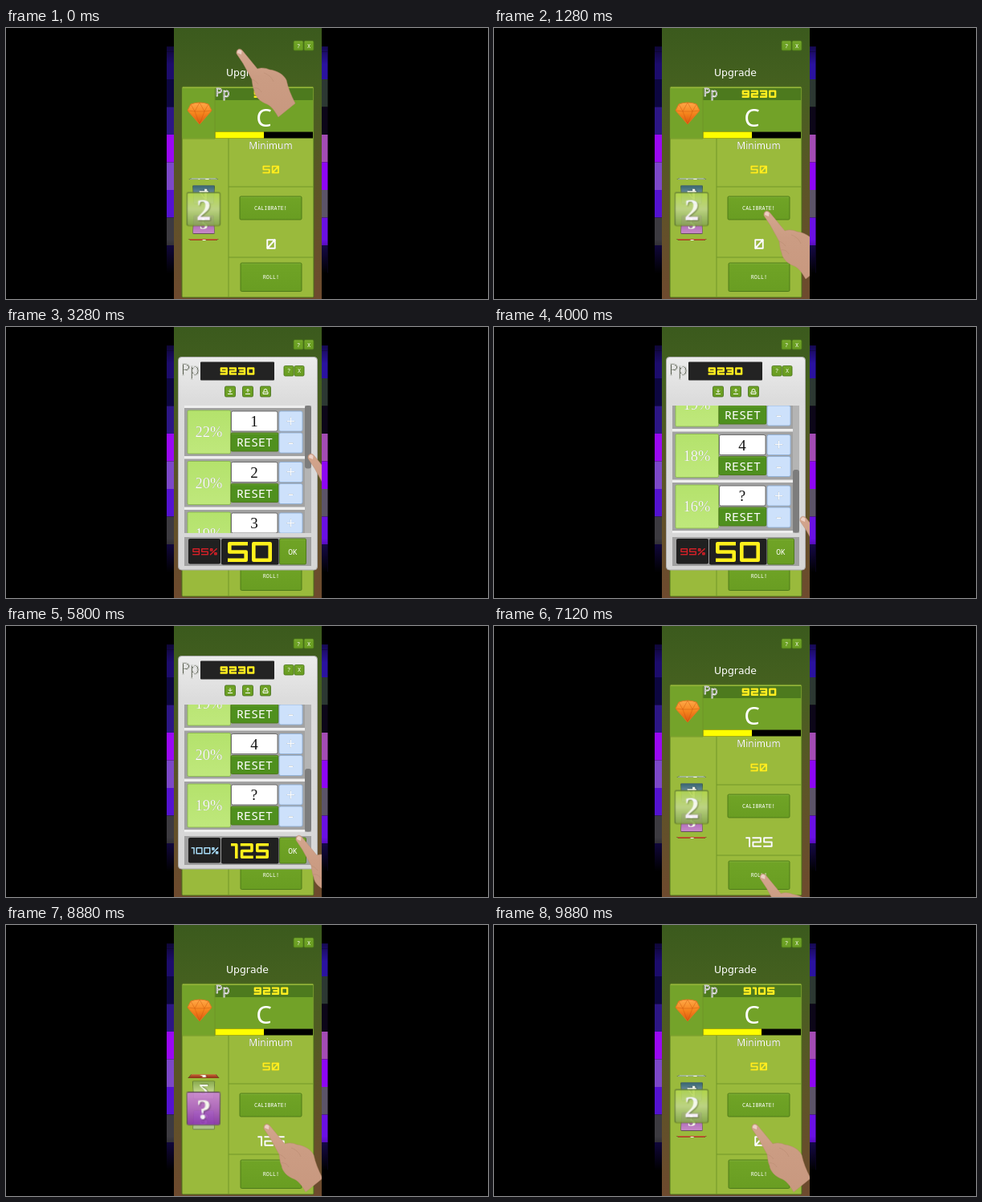
Animation, 600 px wide and 338 px high, one loop 9920 ms. Source, as an HTML page:

```html
<!DOCTYPE html>
<html lang="en">
<head>
<meta charset="utf-8">
<title>Upgrade</title>
<style>
html, body { margin: 0; width: 100%; height: 100%; overflow: hidden; background: #000; }
#stage { position: relative; width: 600px; height: 338px; overflow: hidden; background: #000; }
svg { position: absolute; left: 0; top: 0; }
text { fill: #fff; text-anchor: middle; }
.mono { font-family: "Noto Sans Mono", "DejaVu Sans Mono", monospace; }
.sans { font-family: "Noto Sans", "Open Sans", sans-serif; }
.wide { font-family: "DejaVu Sans", sans-serif; }
.serif { font-family: "Liberation Serif", serif; }
.pp { font-family: "Noto Sans", sans-serif; fill: #3a4030; stroke: #f4f4f4; stroke-width: .9px; }
.sh { filter: drop-shadow(.8px .8px 0 rgba(20, 30, 10, .5)); }
.lcd { fill: none; stroke-linejoin: round; stroke-linecap: square; filter: drop-shadow(.6px .8px 0 rgba(20, 30, 10, .3)); }
#reel { position: absolute; left: 230.3px; top: 210.3px; width: 32.4px; height: 32.4px; perspective: 150px; }
#drum { position: absolute; inset: 0; transform-style: preserve-3d; }
.face {
  position: absolute; inset: 0; box-sizing: border-box; border-radius: 2px;
  border: .7px solid rgba(60, 80, 30, .6); opacity: .9;
  font: bold 28px/31px "Liberation Serif", serif; text-align: center; color: #fff;
  text-shadow: 1px 1px 1px rgba(0, 0, 0, .3);
}
</style>
</head>
<body>
<div id="stage">
  <svg id="base" width="600" height="338"></svg>
  <div id="reel"><div id="drum"></div></div>
  <svg id="over" width="600" height="338"></svg>
</div>
<script>
const LOOP = 9920, TICK = 40;
const $ = id => document.getElementById(id);

// Drawing helpers
const rect = (x, y, w, h, fill, r = 0, more = '') =>
  `<rect x="${x}" y="${y}" width="${w}" height="${h}" rx="${r}" fill="${fill}" ${more}/>`;
const text = (s, x, y, size, cls, more = '') =>
  `<text x="${x}" y="${y}" font-size="${size}" class="${cls}" ${more}>${s}</text>`;
const path = (d, fill, more = '') => `<path d="${d}" fill="${fill}" ${more}/>`;
const grad = (id, ...stops) =>
  `<linearGradient id="${id}" x1="0" y1="0" x2="0" y2="1">` +
  stops.map(([o, c]) => `<stop offset="${o}" stop-color="${c}"/>`).join('') + '</linearGradient>';
const button = (x, y, w, h, label, size, dy, fill = 'url(#btn)') =>
  rect(x, y, w, h, fill, 1.5, 'stroke="#4a7618" stroke-width=".9"') +
  path(`M${x + 1} ${y + 1.1}h${w - 2}`, 'none', 'stroke="#a5cc62" stroke-opacity=".4" stroke-width=".7"') +
  text(label, x + w / 2, y + h / 2 + dy, size, 'mono');
const lcd = (id, color, slash = '') =>
  `<path id="${id}" class="lcd" stroke="${color}" data-slash="${slash}" role="img"/>`;

// Square display digits as strokes in a unit cell
const GLYPHS = {
  0: 'M0 0H1V1H0Z', 1: 'M0 0H.4V1', 2: 'M0 0H1V.5H0V1H1', 3: 'M0 0H1V1H0M.2 .5H1',
  4: 'M0 0V.6H1M.8 0V1', 5: 'M1 0H0V.5H1V1H0', 6: 'M1 0H0V1H1V.5H0', 7: 'M0 0H1V1',
  8: 'M0 0H1V1H0ZM0 .5H1', 9: 'M1 .5H0V0H1V1H0',
  '%': 'M0 0H.3V.3H0ZM1 0L0 1M.7 .7H1V1H.7Z'
};

function setLcd(id, value, cx, cy, w, h, sw) {
  const node = $(id), s = String(value), key = s + w;
  if (node.dataset.key === key) return;
  const iw = w - sw, ih = h - sw, gap = w * .2;
  const widths = [...s].map(c => (c === '1' ? iw * .4 : iw) + sw);
  let x = cx - (widths.reduce((a, b) => a + b) + gap * (s.length - 1)) / 2 + sw / 2;
  const y = cy - ih / 2;
  let d = '';
  [...s].forEach((c, i) => {
    const shape = GLYPHS[c] + (c === '0' && node.dataset.slash ? 'M1 0L0 1' : '');
    d += shape.replace(/([MLHV])([\d.]+)(?: ([\d.]+))?/g, (m, op, a, b) =>
      op === 'H' ? `H${x + a * iw}` :
      op === 'V' ? `V${y + a * ih}` : `${op}${x + a * iw} ${y + b * ih}`);
    x += widths[i] + gap;
  });
  node.setAttribute('d', d);
  node.setAttribute('stroke-width', sw);
  node.setAttribute('aria-label', s);
  node.dataset.key = key;
}

// Side strips, top to bottom, faded to black at both ends
const LEFT = ['#1c0c6c', '#0c0640', '#2c1684', '#9a08f4', '#7c48c8', '#5412d0', '#3c3a40', '#140848'];
const RIGHT = ['#2a12a0', '#2c3832', '#0c0618', '#a44cb4', '#8e06f4', '#5c5468', '#6a10e4', '#1a0a58'];
const strip = (x, w, colors) =>
  colors.map((c, i) => rect(x, 29.5 + 34.5 * i, w, 34.5, c)).join('') +
  rect(x, 23, w, 6.5, colors[0]) + rect(x, 23, w, 283, 'url(#fade)');

$('base').innerHTML =
  '<defs>' +
  '<linearGradient id="fade" x1="0" y1="0" x2="0" y2="1"><stop offset="0" stop-opacity=".5"/>' +
  '<stop offset=".08" stop-opacity="0"/><stop offset=".85" stop-opacity="0"/><stop offset="1"/></linearGradient>' +
  grad('wall', [0, '#3b5a1d'], [.2, '#44601f'], [.55, '#5a5526'], [1, '#6e4a2e']) +
  grad('btn', [0, '#70a426'], [1, '#699d22']) +
  grad('gem', [0, '#ffa848'], [.5, '#f5841c'], [1, '#dc5510']) +
  '</defs>' +
  strip(200, 9, LEFT) + strip(393, 7.5, RIGHT) +
  rect(209, 0, 184, 338, 'url(#wall)') +
  button(358, 16, 12, 12, '?', 7, 2.5) + button(371, 16, 12, 12, 'X', 7, 2.5) +
  text('Upgrade', 300.5, 60, 12.4, 'wide') +
  rect(219, 73, 164, 263, '#9aba3c', 1.5, 'stroke="#4c6e1c" stroke-width="1"') +
  rect(219.5, 75, 40.5, 62.5, '#74a32a') +
  rect(260, 75, 122, 15, '#4d7a1e') +
  rect(260, 90, 122, 39.5, '#72a228') +
  path('M260 75V138M219 138H260M277 138V336M277 198H383M277 286H383', 'none',
    'stroke="#6f9428" stroke-width=".9"') +
  text('P', 265, 85, 14, 'pp sh') + text('p', 274, 85.5, 14, 'pp sh') +
  lcd('points', '#ffee20') +
  text('C', 321, 123, 31, 'sans') +
  rect(260.5, 129.5, 121.5, 8, '#000') +
  '<rect id="bar" x="260.5" y="129.5" height="8" fill="#ffff00"/>' +
  path('M226 103L230 95Q241 91 252 95L256 103L241 120Z', 'url(#gem)',
    'stroke="#e07a20" stroke-width="1" stroke-linejoin="round"') +
  path('M226 103L235 104H247L256 103M230 95L235 104L241 93L247 104L252 95M235 104L241 120L247 104', 'none',
    'stroke="#c8560c" stroke-width=".7" stroke-opacity=".6"') +
  text('Minimum', 329.5, 151, 12, 'sans sh') +
  lcd('min', '#ffee20', 1) +
  button(291, 210, 77, 29, 'CALIBRATE!', 6.8, 2.5) +
  lcd('bet', '#fff', 1) +
  button(292, 293, 76, 35.5, 'ROLL!', 6.8, 2.5);

// Reel faces: [label, top, middle, bottom]
const FACES = [
  ['1', '#d05a38', '#b04024', '#8a2410'], ['2', '#b4d84c', '#c0d68c', '#86a850'],
  ['3', '#b0c888', '#a0b4a0', '#8a98a0'], ['4', '#94aac8', '#7490b0', '#2c5c78'],
  ['?', '#cc84d8', '#b060c8', '#8a30b0']
];
$('drum').innerHTML = FACES.map(([s, a, b, c], i) =>
  `<div class="face" style="background:linear-gradient(${a},${b},${c});` +
  `transform:rotateX(${i * 72}deg) translateZ(37px)">${s}</div>`).join('');

const ROW = 63.5, SCROLL = 161;
const blue = (y, s, dy) =>
  rect(340, y, 29, 25, '#cde1fb', 2, 'stroke="#8fb0d8" stroke-width=".9"') +
  text(s, 354.5, y + dy, 21, 'serif sh');
const row = (label, i) => `<g transform="translate(0 ${i * ROW})">` +
  rect(222, 101, 150, 60, '#a2a2a2') +
  rect(226, 104, 53.5, 54, 'url(#tile)', 1.5, 'stroke="#86b648" stroke-width=".8"') +
  text('', 252.5, 137, 18.5, 'serif sh', `id="pct${i}"`) +
  rect(280.5, 105, 57.5, 25, '#fff', 2, 'stroke="#555" stroke-width=".8"') +
  text(label, 309, 124, 19, 'serif', 'style="fill:#111"') +
  button(280, 132, 59, 23, 'RESET', 15, 5.5, '#4f901e') +
  blue(105, '+', 19.5) + blue(132, '-', 18) + '</g>';

const icon = (x, d) => rect(x, 74, 13, 13, 'url(#btn)', 1.5, 'stroke="#3f6a16" stroke-width=".8"') +
  path(d, 'none', `transform="translate(${x + 6.5} 80.5)" stroke="#fff" stroke-width="1"`);

const HAND = 'M-4 2C-5 -4 1 -6 4 -1L22 21C27 19 33 20 37 22C46 23 55 28 58 35' +
  'C60 45 64 54 69 64L48 81C44 74 40 68 34 65C26 62 19 56 18 48C16 44 16 40 15 34L4 14Z';

$('over').innerHTML =
  '<defs>' +
  grad('sheet', [0, '#ececec'], [.2, '#dcdcdc'], [1, '#d6d6d6']) +
  grad('tile', [0, '#b4e26c'], [1, '#bfe87c']) +
  grad('skin', [0, '#d4a68e'], [.4, '#cb9c83'], [1, '#c8987f']) +
  '<clipPath id="list"><rect x="222" y="98" width="150" height="159"/></clipPath>' +
  '<clipPath id="phone"><rect x="209" y="0" width="184" height="338"/></clipPath>' +
  '</defs>' +
  '<g id="dialog">' +
  rect(214.5, 37.5, 173, 265.5, 'url(#sheet)', 4, 'stroke="#aaa" stroke-width="1"') +
  text('P', 223.5, 60, 19, 'pp sh') + text('p', 235, 60, 19, 'pp sh') +
  rect(242, 43.5, 92, 23, '#232323', 1) + lcd('points2', '#ffee20') +
  button(346, 48.5, 12, 12.5, '?', 7, 2.5) + button(359, 48.5, 12, 12.5, 'X', 7, 2.5) +
  icon(272.5, 'M0 -3V1M-2 -1L0 1L2 -1M-3 3H3') +
  icon(294.5, 'M0 1V-3M-2 -1L0 -3L2 -1M-3 3H3') +
  icon(316.5, 'M-2 0V-1A2 2 0 0 1 2 -1V0M-3 .5H3V3H-3Z') +
  rect(222, 98, 158, 159, '#eee') +
  '<g clip-path="url(#list)"><g id="rows">' + ['1', '2', '3', '4', '?'].map(row).join('') + '</g></g>' +
  rect(372, 98, 8, 159, '#b4b4b4') +
  '<rect id="thumb" x="372" width="8" height="78.5" rx="3" fill="#7d7d7d"/>' +
  rect(222, 262, 158, 36, '#a0a0a0') +
  rect(227, 264, 40, 31.5, '#202020', 2) + lcd('sum', '#d02028') +
  rect(268, 264, 71.5, 32.5, '#202020', 2) + lcd('cost', '#fff01c') +
  button(340.5, 264, 33, 32, 'OK', 9.5, 3.5) +
  '</g>' +
  '<g clip-path="url(#phone)"><g id="hand">' +
  path(HAND, 'url(#skin)', 'stroke="#b98a70" stroke-width=".5"') +
  path('M-3 1C-3 -3 0 -4 2.500 -1L2 3Z', '#ecd0c4') +
  path('M15 34C18 35 21 37 23 40M17 45C21 44 25 46 27 50M30 26C36 28 40 32 42 37',
    'none', 'stroke="#b08068" stroke-width=".7" stroke-opacity=".5"') +
  '</g></g>';

// Timing
const OPEN = 1480, CLOSE = 6200;
const TIPS = [
  [0, 291, 30], [120, 291, 30], [1120, 340, 232], [1560, 340, 232], [2880, 380, 162],
  [3280, 380, 162], [4000, 385, 240], [4500, 358, 212], [4880, 358, 212], [5120, 358, 148],
  [5380, 358, 148], [5800, 365, 265], [6200, 365, 265], [7160, 335, 313], [7520, 335, 313],
  [8040, 325, 252], [LOOP, 325, 252]
];
const TAPS = [[4560, 4], [4700, 4], [4840, 4], [5200, 3], [5340, 3]];
const START = [22, 20, 19, 18, 16];
const SPIN = { from: 7600, to: 9280, faces: 15, power: 1.423 };

const part = (t, a, b) => Math.min(1, Math.max(0, (t - a) / (b - a)));
const ease = u => u * u * (3 - 2 * u);

function tip(t) {
  const i = TIPS.findIndex(k => k[0] > t);
  const [t0, x0, y0] = TIPS[i - 1], [t1, x1, y1] = TIPS[i];
  const u = ease(part(t, t0, t1));
  return [x0 + (x1 - x0) * u, y0 + (y1 - y0) * u];
}

function draw(t) {
  const [x, y] = tip(t);
  $('hand').setAttribute('transform', `translate(${x} ${y})`);

  $('dialog').setAttribute('opacity', part(t, OPEN, OPEN + 120) - part(t, CLOSE, CLOSE + 120));
  const drag = ease(part(t, 3280, 4000));
  $('rows').setAttribute('transform', `translate(0 ${-SCROLL * drag})`);
  $('thumb').setAttribute('y', 98 + 80 * drag);

  const pct = START.slice();
  const done = TAPS.filter(([at]) => t >= at);
  done.forEach(([, i]) => pct[i]++);
  pct.forEach((p, i) => { $('pct' + i).textContent = p + '%'; });
  const total = pct.reduce((a, b) => a + b), cost = 50 + 15 * done.length;
  setLcd('sum', total + '%', 247.5, 280.3, total < 100 ? 9 : 8.2, 8.5, 1.5);
  $('sum').setAttribute('stroke', total < 100 ? '#d02028' : '#a8dcf8');
  if (cost < 100) setLcd('cost', cost, 303.5, 280.5, 25, 25, 4.6);
  else setLcd('cost', cost, 303.5, 280.5, 16, 19, 3.6);

  const spin = 1 - Math.pow(1 - part(t, SPIN.from, SPIN.to), SPIN.power);
  $('drum').style.transform = `rotateX(${-72 * (1 + SPIN.faces * spin)}deg)`;

  $('bar').setAttribute('width', 60.5 + 12 * part(t, 9080, 9280));
  setLcd('points', t < 9640 ? 9230 : 9105, 330, 82.2, 9.3, 9.5, 2.4);
  setLcd('points2', 9230, 288, 55, 9.3, 9.5, 2.4);
  setLcd('min', 50, 329.7, 176.5, 9.4, 9.8, 2);
  setLcd('bet', t >= CLOSE && t < 9440 ? 125 : 0, 330, 269.5, 11.5, 12.5, 2);
}

const begin = performance.now();
function loop() {
  const t = (performance.now() - begin) % LOOP;
  draw(Math.floor(t / TICK) * TICK);
  requestAnimationFrame(loop);
}
loop();
</script>
</body>
</html>
```
